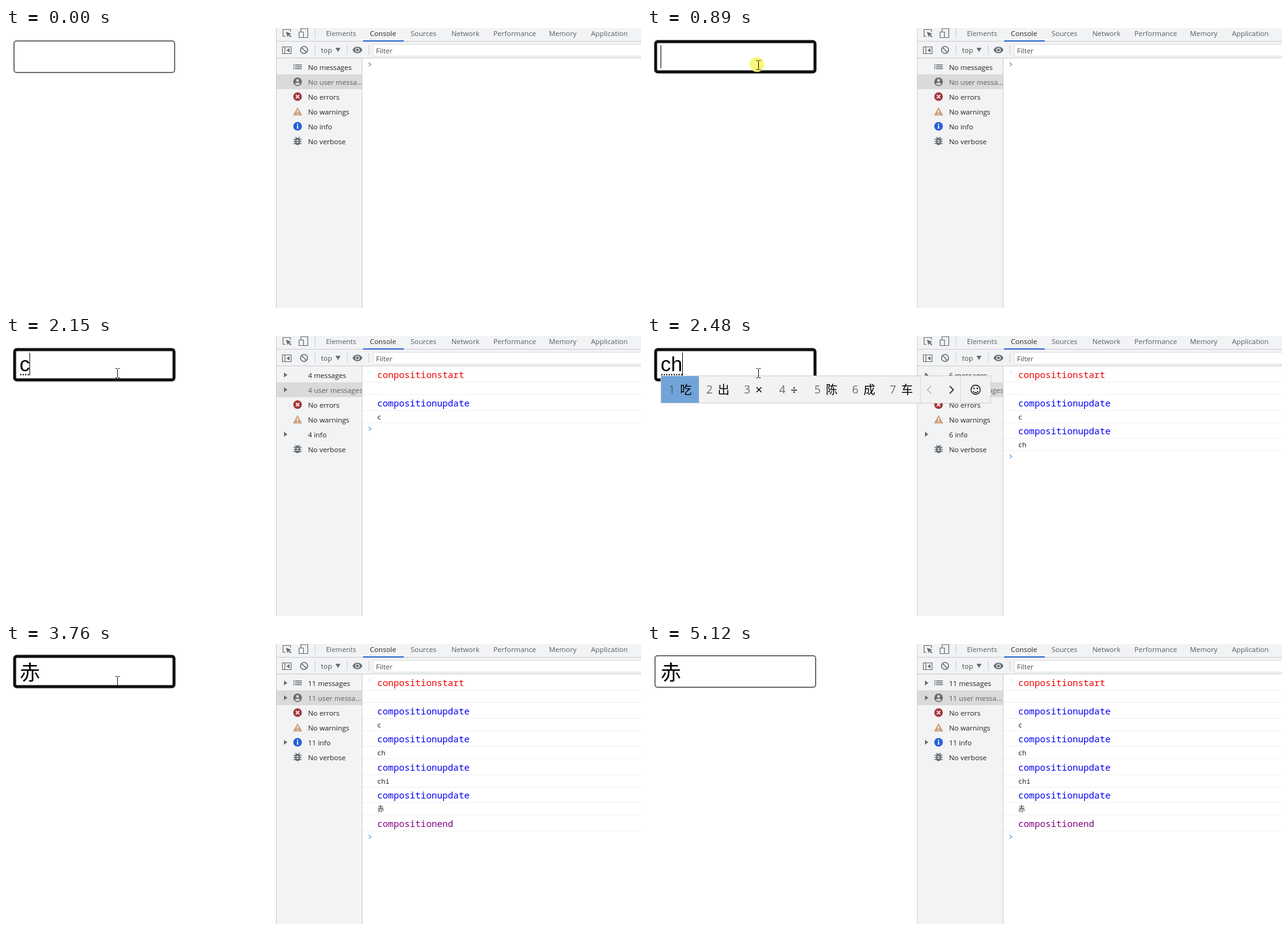
Recreate the animation shown at these times as an HTML page with a canvas. Size 1028 px wide and 453 px high, loop 5.25 s.

```html
<!DOCTYPE html>
<html lang="zh">
<head>
<meta charset="utf-8">
<title>Composition events</title>
<style>
html, body { margin: 0; height: 100%; overflow: hidden; background: #fff; }
canvas { display: block; }
</style>
</head>
<body>
<canvas id="stage" width="1028" height="453"></canvas>
<script>
const ctx = document.getElementById('stage').getContext('2d');
const LOOP = 5250;
const UI = '"Open Sans", "Noto Sans", sans-serif';
const MONO = '"Noto Sans Mono", "Noto Sans CJK SC", monospace';
const CJK = '"Noto Sans CJK SC", "Noto Sans CJK", sans-serif';
const INPUT = '33.33px "Liberation Sans", "Noto Sans CJK SC", sans-serif';
const GRAY = '#6a6d71', LINE = '#cbcdd1';

// start, input text, message count, sidebar settled, candidates, candidate list end
const states = [
  [0, '', 0, true],
  [2150, 'c', 4, false],
  [2220, 'c', 4, true, '才从曾此存菜草', 450],
  [2480, 'ch', 6, false, '吃出×÷陈成车', 442],
  [2550, 'ch', 6, true, '吃出×÷陈成车', 442],
  [2680, 'chi', 8, false, '赤吃持尺池迟齿', 489],
  [2750, 'chi', 8, true, '赤吃持尺池迟齿', 489],
  [3230, '赤', 11, false],
  [3300, '赤', 11, true]
];
const caretOn = [[890, 1420], [1950, 3160], [3230, 3760], [4300, 4860]];
const log = ['conpositionstart', '', 'compositionupdate', 'c', 'compositionupdate', 'ch',
  'compositionupdate', 'chi', 'compositionupdate', '赤', 'compositionend'];
const logColor = { conpositionstart: '#f00000', compositionupdate: '#0000f0', compositionend: '#800080' };

const within = (t, a, b) => t >= a && t < b;
const smooth = u => { u = Math.min(1, u); return u * u * (3 - 2 * u); };

function box(x, y, w, h, color) {
  ctx.fillStyle = color;
  ctx.fillRect(x, y, w, h);
}
function text(s, x, y, color, font) {
  ctx.fillStyle = color;
  ctx.font = font;
  ctx.fillText(s, x, y);
}
const label = (s, x, y, color = '#2b2b2b') => text(s, x, y, color, '11.4px ' + UI);
function at(x, y, draw) {
  ctx.save();
  ctx.translate(x, y);
  draw();
  ctx.restore();
}
function fill(d, color) {
  ctx.fillStyle = color;
  ctx.fill(new Path2D(d), 'evenodd');
}
function stroke(d, color, width = 1) {
  ctx.strokeStyle = color;
  ctx.lineWidth = width;
  ctx.stroke(new Path2D(d));
}
function dot(x, y, r, color) {
  ctx.fillStyle = color;
  ctx.beginPath();
  ctx.arc(x, y, r, 0, 7);
  ctx.fill();
}

const icons = {
  list() {
    for (const y of [-3, 0, 3]) {
      box(-7, y - 1, 2, 1.5, GRAY);
      box(-4, y - 1, 11, 1.5, GRAY);
    }
  },
  user() {
    dot(0, 0, 7, GRAY);
    dot(0, -2.2, 2.2, '#dadada');
    fill('M-4.3 3.4C-3 .8 3 .8 4.3 3.4C2.5 5.8-2.5 5.8-4.3 3.4Z', '#dadada');
  },
  error() {
    dot(0, 0, 7, '#a8383c');
    stroke('M-2.6-2.6L2.6 2.6M2.6-2.6L-2.6 2.6', '#fff', 1.7);
  },
  warning() {
    fill('M0-7L7.5 6.5H-7.5Z', '#cfa07a');
    box(-.8, -2.5, 1.6, 4.5, '#fff');
    box(-.8, 3.2, 1.6, 1.6, '#fff');
  },
  info() {
    dot(0, 0, 7, '#2a5fd8');
    box(-1, -4, 2, 2, '#fff');
    box(-1, -1, 2, 5, '#fff');
  },
  bug() {
    stroke('M-6.5-3H6.5M-6.5 .5H6.5M-6.5 4H6.5M-3.5-6.5L-1.5-4.5M3.5-6.5L1.5-4.5', GRAY, 1.5);
    fill('M-4-1C-4-7 4-7 4-1V2C4 8-4 8-4 2Z', GRAY);
    stroke('M-1.7-1H1.7M-1.7 2H1.7', '#f1f3f4', 1.3);
  }
};

function toolbar() {
  box(437, 0, 591, 49, '#f1f3f4');
  box(437, 21, 591, 1, LINE);
  box(437, 48, 591, 1, LINE);
  stroke('M452.5 13.5H448.5V2.5H460.5V6', GRAY, 1.2);
  fill('M453 6L462 9.3L458.6 10.4L462 13.8L460.6 15.2L457.2 11.8L456 15Z', GRAY);
  stroke('M477.5 6V1H488.5V15.5H482M474.5 6.5H481.5V15.5H474.5Z', GRAY, 1.2);
  const tabs = [['Elements', 518], ['Console', 589], ['Sources', 655], ['Network', 721],
    ['Performance', 789], ['Memory', 879], ['Application', 947]];
  for (const [name, x] of tabs) label(name, x, 13, name == 'Console' ? '#2b2b2b' : '#5a5e63');
  box(578, 20, 66, 2, '#2d67cf');

  stroke('M447.5 30.5H461.5V41.5H447.5ZM451.5 30.5V41.5', GRAY, 1.2);
  fill('M459 32.5V39.5L454 36Z', GRAY);
  stroke('M476.8 35.5a5.7 5.7 0 1 0 11.4 0a5.7 5.7 0 1 0-11.4 0M478.5 31.5L486.5 39.5', GRAY, 1.6);
  label('top', 510, 40, '#4a4d51');
  fill('M533.5 32H541.5L537.5 39Z', GRAY);
  fill('M561 35.5C564 28.5 574 28.5 577 35.5C574 42.5 564 42.5 561 35.5Z', GRAY);
  dot(569, 35.5, 3.6, '#f1f3f4');
  dot(569, 35.5, 2.2, GRAY);
  box(500, 0, 1, 17, LINE);
  for (const x of [500, 552, 587]) box(x, 27, 1, 16, LINE);
  box(594, 26, 434, 20, '#dcdee0');
  box(595, 27, 433, 18, '#fff');
  label('Filter', 599, 41, '#4a4d51');
}

function sidebar(n, settled) {
  box(437, 49, 139, 404, '#f1f3f4');
  box(438, 75, 138, 24, '#dadada');
  const count = n || 'No';
  const rows = [
    ['list', count + ' messages', true],
    ['user', count + (settled ? ' user messa...' : ' user messages'), true],
    ['error', 'No errors'],
    ['warning', 'No warnings'],
    ['info', count + ' info', true],
    ['bug', 'No verbose']
  ];
  ctx.save();
  ctx.beginPath();
  ctx.rect(437, 49, 139, 404);
  ctx.clip();
  rows.forEach(([icon, name, counted], i) => {
    const y = 63 + 24 * i;
    if (settled || !counted) at(472, y, icons[icon]);
    if (n && counted) fill(`M450 ${y - 4}L455.5 ${y}L450 ${y + 4}Z`, GRAY);
    label(name, 489, y + 5, icon == 'user' ? '#606060' : '#222');
  });
  ctx.restore();
  box(437, 0, 1, 453, LINE);
  box(576, 49, 1, 404, LINE);
}

function prompt(y, color) {
  stroke(`M587 ${y - 3}L590.7 ${y}L587 ${y + 3}`, color, 1.5);
}

function consoleLog(n) {
  let y = 49;
  for (const s of log.slice(0, n)) {
    const color = logColor[s];
    y += color ? 25.5 : 20;
    if (color) text(s, 601, y - 6.5, color, '14.67px ' + MONO);
    else text(s, 601, y - 5.5, '#222', '11px ' + MONO);
    box(577, Math.floor(y), 451, 1, '#f0f0f0');
  }
  if (n) prompt(58.5, '#dceef6');
  prompt(Math.floor(y) + 10, n ? '#72acdf' : '#979ca3');
}

function inputBox(t, value) {
  const focused = within(t, 890, 5120), top = value == '赤' ? 18 : 20;
  ctx.beginPath();
  if (focused) ctx.roundRect(14, top + 2, 258, 49, 3.5);
  else ctx.roundRect(13, top + 1, 260, 51, 4);
  ctx.strokeStyle = focused ? '#101010' : '#707070';
  ctx.lineWidth = focused ? 4.8 : 2;
  ctx.stroke();

  text(value, 22, value == '赤' ? 58 : 57, '#000', INPUT);
  const end = 22 + Math.floor(ctx.measureText(value).width);
  if (/^c/.test(value))
    for (let x = 23; x < end; x += 4) box(x, 61.5, 2, 2, '#000');
  if (caretOn.some(([a, b]) => within(t, a, b))) box(end, value ? 27 : 28, 1, 37, '#000');
}

function candidateBar(chars, sep) {
  box(22, 64, sep + 115 - 22, 45, '#cfcfcf');
  box(23, 65, sep + 114 - 23, 43, '#f2f2f2');
  box(23, 65, 61, 43, '#70a4d8');
  let x = 35;
  [...chars].forEach((c, i) => {
    const narrow = '×÷'.includes(c);
    text(i + 1, x, 93, i ? '#6c6c6c' : '#4b5b6b', '18px ' + UI);
    text(c, x + 18.5, 93.5, '#000', narrow ? '20px ' + UI : '19px ' + CJK);
    x += narrow ? 57 : 61;
  });
  at(sep, 87, () => {
    box(0, -22, 1, 43, '#d6d6d6');
    box(65, -22, 1, 43, '#d6d6d6');
    stroke('M18-6L12 0L18 6', '#a8a8a8', 1.3);
    stroke('M48-6L54 0L48 6', '#111', 1.5);
    stroke('M82.5 0a7.5 7.5 0 1 0 15 0a7.5 7.5 0 1 0-15 0M86 2.2C87.5 5.4 92.5 5.4 94 2.2', '#111', 1.4);
    dot(87.3, -2.3, 1.2, '#111');
    dot(92.7, -2.3, 1.2, '#111');
  });
}

// The pointer is sampled every 70 ms, as in a screen recording.
function pointer(t) {
  if (!within(t, 70, 4860)) return;
  let x, y;
  if (t < 4090) {
    const left = 1 - Math.min(10, Math.floor((t - 70) / 70)) / 10;
    x = 180 + 677 * left ** 3.3;
    y = 60 + 380 * left ** 2.7;
  } else {
    const u = (Math.floor((t - 4090) / 70) + 1) / 11;
    x = 180 + 805 * smooth(u * 1.22);
    y = 60 + 380 * smooth(u);
  }
  if (within(t, 890, 1020)) dot(178, 59, 12, '#fbf77c');
  at(Math.round(x), Math.round(y), () => {
    if (x < 274 && y < 73)
      stroke('M-3-7.5H-.5M1.5-7.5H4M.5-7V7M-3 7.5H-.5M1.5 7.5H4', '#111', 1);
    else {
      const arrow = 'M.5 .5V16.5L4.2 13L6.8 18.5L9 17.5L6.6 12.2H11.5Z';
      fill(arrow, '#fff');
      stroke(arrow, '#000', 1);
    }
  });
}

function draw(now) {
  const t = now % LOOP;
  const [, value, n, settled, chars, sep] = states.findLast(s => t >= s[0]);
  box(0, 0, 1028, 453, '#fff');
  toolbar();
  sidebar(n, settled);
  consoleLog(n);
  inputBox(t, value);
  if (chars) candidateBar(chars, sep);
  pointer(t);
}

const start = performance.now();
function tick() {
  draw(performance.now() - start);
  requestAnimationFrame(tick);
}
tick();
</script>
</body>
</html>
```
